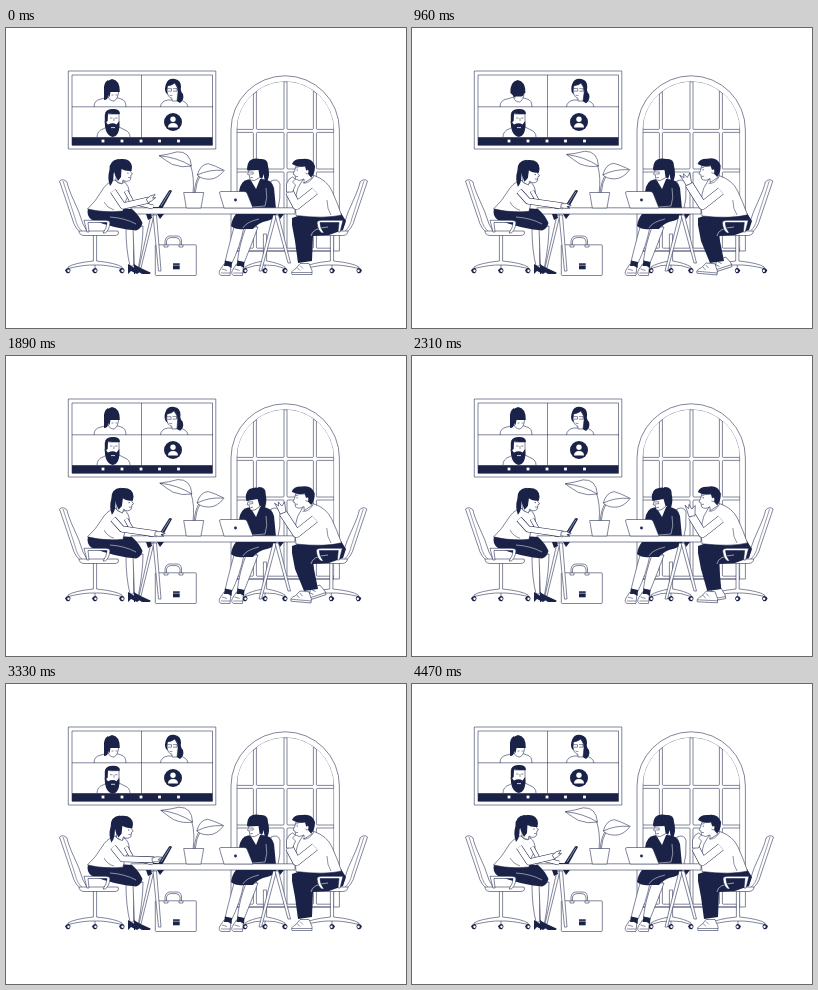
These frames come from a looping animation (400x300 px, 4.5 s). An HTML page with a canvas:

```html
<!DOCTYPE html>
<html lang="en">
<head>
<meta charset="utf-8">
<title>Hybrid meeting</title>
<style>
html, body { margin: 0; width: 100%; height: 100%; overflow: hidden; background: #fff; }
canvas { display: block; width: 100%; height: 100%; }
</style>
</head>
<body>
<canvas id="stage" width="400" height="300"></canvas>
<script>
const LOOP = 4500, STEP = 30;
const NAVY = '#1b2248', WHITE = '#fff', LINE = 0.55;
const ctx = document.getElementById('stage').getContext('2d');
const paths = new Map();

function path(d) {
  if (!paths.has(d)) paths.set(d, new Path2D(d));
  return paths.get(d);
}
function outline(d, width = LINE, color = NAVY) {
  ctx.strokeStyle = color;
  ctx.lineWidth = width;
  ctx.stroke(path(d));
}
function fill(d, color) {
  ctx.fillStyle = color;
  ctx.fill(path(d));
}
const dark = d => fill(d, NAVY);
function light(d, width = LINE) {
  fill(d, WHITE);
  outline(d, width);
}
function box(x, y, w, h, r = 0) {
  ctx.beginPath();
  ctx.roundRect(x, y, w, h, r);
  ctx.fillStyle = WHITE;
  ctx.fill();
  ctx.strokeStyle = NAVY;
  ctx.lineWidth = LINE;
  ctx.stroke();
}
function disc(x, y, r, color = NAVY) {
  ctx.beginPath();
  ctx.arc(x, y, r, 0, Math.PI * 2);
  ctx.fillStyle = color;
  ctx.fill();
}
// Runs draw() moved by dx, dy and turned by deg about px, py.
function pose(px, py, deg, dx, dy, draw) {
  ctx.save();
  ctx.translate(px + dx, py + dy);
  ctx.rotate(deg * Math.PI / 180);
  ctx.translate(-px, -py);
  draw();
  ctx.restore();
}
function mirrored(draw) {
  ctx.save();
  ctx.translate(415, 0);
  ctx.scale(-1, 1);
  draw();
  ctx.restore();
}
// Outlined tube through the given joints.
function limb(points, width) {
  ctx.beginPath();
  points.forEach(([x, y]) => ctx.lineTo(x, y));
  ctx.strokeStyle = NAVY;
  ctx.lineWidth = width + LINE;
  ctx.stroke();
  ctx.strokeStyle = WHITE;
  ctx.lineWidth = width - LINE;
  ctx.stroke();
}
const lerp = (a, b, k) => a + (b - a) * k;
const mix = (a, b, k) => a.map((v, i) => lerp(v, b[i], k));
function ease(t, start, end) {
  const k = Math.min(1, Math.max(0, (t - start) / (end - start)));
  return k * k * (3 - 2 * k);
}
const pulse = (t, a, b, c, d) => ease(t, a, b) - ease(t, c, d);
const wave = (t, cycles, phase = 0) => Math.sin((t / LOOP * cycles + phase) * Math.PI * 2);

function archWindow() {
  light('M225 234V102A54.2 54.2 0 0 1 333.4 102V223H225');
  const inner = 'M231 223V102A48.3 48.3 0 0 1 327.6 102V223Z';
  outline(inner);
  ctx.save();
  ctx.clip(path(inner));
  const columns = [231, 250.4, 281, 310.4], ends = [247.4, 278, 307.4, 328];
  const rows = [40, 104.4, 144, 183.6];
  columns.forEach((x, i) => rows.forEach((y, j) =>
    box(x, y, ends[i] - x, j ? 36.6 : 61.4, 1)));
  ctx.restore();
}

function videoCall(t) {
  box(62.3, 43, 147.5, 78);
  box(66, 47, 140.5, 70.3);

  const down = pulse(t, 30, 330, 1150, 1600);
  light('M88 79Q88 72 95 71L102 69H109L115 71Q120 72 120 79');
  if (down < 0.6) pose(103, 54, down * -20, 0, 0, () =>
    dark('M102 52Q97 55 98 63V72Q102 72 102 68L104 60Z'));
  pose(106, 70, 0, down * -0.4, down, () => {
    light('M102 62V68Q103 73 108 73Q112 71 112.5 64V60Z');
    dark('M98.8 64Q98 53 106 51Q114 52 113.8 64H104.5L103.5 69L101 66Z');
    if (down > 0.4) dark('M99.5 62H113.5Q112 68 109 67.5H103Z');
    else outline('M105.5 67h2M109.5 67h2', 0.5);
  });

  light('M154.5 79Q155 73 162 72H173Q181 73 182 79');
  pose(167, 73, wave(t, 2) * 2.5 * (1 - ease(t, 2400, 2700)), 0, 0, () => {
    dark('M160 56Q162 50 169 51Q175 52 175 59Q174 63 177 66Q178.5 72 174 75L169 72L160 65Q158 61 160 56Z');
    light('M161.5 58Q167 57 168.5 55Q172 59 172 64L171 73H166V70.5Q161.5 69 161 63Z');
    outline('M161.5 60.6h4v2.6h-4M167 60.6h4v2.6h-4M163.5 67.2q2 1 3 0', 0.5);
  });

  light('M91 109Q91 103 97 101L101 99H113L119 102Q124 104 124 109');
  pose(106, 105, 0, 0, pulse(t, 2750, 3100, 3300, 3700) * 0.7, () => {
    light('M100 86H113V99Q112 106 107 106Q101 105 100 98Z');
    dark('M98.8 95V87Q99 81.5 106 81Q114 80.5 114 86Q106 86 102 85.5L101.7 93Z');
    dark('M98.8 93L102 96.5Q107 94 110.5 96.5L113.2 93Q114.5 108 106.5 109Q98.5 107 98.8 93Z');
    outline('M104 90h2.5M109 90h2.5M108 90v3', 0.5);
    outline('M105 99.6h4', 0.8, WHITE);
  });

  disc(167, 94, 9);
  disc(167, 91.2, 2.7, WHITE);
  fill('M162 99.5Q162 95 167 95Q172 95 172 99.5Z', WHITE);
  outline('M135.5 47V109M66 78.8H207');
  ctx.fillStyle = NAVY;
  ctx.fillRect(66, 109.2, 140.5, 8.1);
  ctx.fillStyle = WHITE;
  [97, 116, 135, 153.5, 172.5].forEach(x => ctx.fillRect(x - 1.4, 111.6, 2.8, 2.8));
}

function plant(t) {
  const sway = wave(t, 2, 0.7);
  outline('M188 166Q189 153 194 146M189 166Q190 154 195 146');
  pose(187, 165, sway * 1.3, 0, 0, () => {
    outline('M185 137Q189 149 187 166');
    light('M154 127Q163 126 172 123.5Q185 123 186 138Q177 140 167 136Q162 133 154 127Z');
    outline('M154 127Q172 129 186 138');
  });
  pose(188, 165, -sway * 0.8, 0, 0, () => {
    light('M191 147Q194 136 202 135.5Q208 137 218 142Q211 151 203 151Q195 151 191 147Z');
    outline('M217 142Q203 141 191 147');
  });
  light('M177.7 164.5H197.7L195 180H180.3Z');
}

function briefcase() {
  light('M159 217V213Q160 208 164 208H171Q175 208 175.5 213V217H174V213Q173 209.6 170 209.6H165Q161 209.6 160.5 213V217Z');
  box(149.3, 216.8, 41, 30.7, 1);
  outline('M158 217v2h4v-2M173 217v2h4v-2');
  ctx.fillStyle = NAVY;
  ctx.fillRect(167, 235.3, 6.7, 6);
  outline('M167 237.3h7', 0.5, WHITE);
}

function caster(x, y = 242.5) {
  dark(`M${x - 3} ${y}Q${x - 2} ${y - 3} ${x + 1} ${y - 2.5}Q${x + 4} ${y} ${x + 1} ${y + 2.7}Q${x - 2} ${y + 3} ${x - 3} ${y}Z`);
  disc(x + 0.5, y + 0.2, 1.2, WHITE);
}
function chairBase(x, reach) {
  light(`M${x - 1.6} 206h3.2V233Q${x + reach - 6} 235 ${x + reach} 239V240.5Q${x + 10} 236.5 ${x} 237Q${x - 10} 236.5 ${x - reach} 240.5V239Q${x - reach + 6} 235 ${x - 1.6} 233Z`);
  outline(`M${x} 237V241`);
  [x - reach, x, x + reach].forEach(c => caster(c));
}
function sideChair() {
  chairBase(89, 27);
  light('M53.5 153Q57 150 61 154Q62 160 68 173Q73 183 77 196L82 205L77 206Q69 202 66 190Z');
  outline('M57 153L69 190Q71 200 78 205', 0.45);
  light('M73 203H112Q114 207.5 108 207.5H78Q73 207 73 203Z');
}
function armrest() {
  light('M78 192.3H99Q104 192.5 104 195Q103 203 99 205H97Q101 200 101 194.5H82L83 204H81Z');
}

function sneaker(x, y, turn) {
  pose(x + 14, y, turn, 0, 0, () => {
    light(`M${x + 8} ${y}H${x + 17}L${x + 20} ${y + 7}V${y + 11}H${x}Q${x - 2} ${y + 8} ${x + 4} ${y + 5}Z`);
    outline(`M${x} ${y + 9}H${x + 20}M${x + 5} ${y + 4}l3 3M${x + 8} ${y + 2}l3 3`, 0.5);
  });
}

function man(t) {
  const talk = pulse(t, 60, 390, 2050, 2600);
  const gesture = pulse(t, 350, 500, 900, 1080) * wave(t, 8);
  pose(327, 243, 0, talk * -0.7, 0, () => mirrored(sideChair));

  // The near foot tucks back under the chair while talking.
  if (talk > 0.05) sneaker(lerp(286, 297, talk), lerp(236, 230, talk), talk * -18);
  sneaker(286, 235.5, talk * 5);
  const ankle = talk * 6;
  ctx.fillStyle = NAVY;
  ctx.beginPath();
  [[286, 190], [300, 185], [335, 185], [340, 193], [337, 202], [323, 207], [307, 208],
   [306 + ankle, 233], [292 + ankle, 235], [289, 213], [286, 197]]
    .forEach(([x, y]) => ctx.lineTo(x, y));
  ctx.fill();
  outline('M305 208Q306 200 322 199', 0.55, WHITE);

  pose(325, 188, talk * -0.8, 0, 0, () => {
    light('M299 148L308 147.5Q321 152 326 163Q331 174 335.5 187Q319 191 290 187.5Q288 171 292 160Z');
    outline('M308 148Q303 156 297 155M325 187Q321 181 321 172', 0.5);
  });
  pose(300, 149, talk * -1.5 + gesture * 0.7, 0, talk * -0.5, () => {
    light('M290 138L288.5 143L287 146L289 147L289.5 151Q293 154 298 151V155L306 150L304 139Z');
    dark('M286 136Q288 130.5 296 131Q306 129 309 138Q309 146 305 149.5L302 146L300 142L299 138Q292 140 286 136Z');
    disc(291.3, 142, 0.6);
    outline('M289.5 140l3-.4M289.5 148.5h2.5', 0.5);
    light('M300.5 142q3 -1 2 3q-1 2 -3 0');
  });

  const [x, y] = mix([283.5, 164], [277, 157 + gesture], talk);
  limb([[309, 163], [290.5, 177.5], [x, y]], 8);
  pose(x, y, talk * -18 + gesture * 7, 0, 0, () => light(talk < 0.5
    ? `M${x - 3} ${y}L${x - 3} ${y - 8}Q${x - 1} ${y - 14} ${x + 3} ${y - 15}L${x + 6} ${y - 13}L${x + 3} ${y - 10}L${x + 6} ${y - 7}L${x + 3} ${y}Z`
    : `M${x - 3} ${y}L${x - 4} ${y - 7}L${x - 5} ${y - 12}L${x - 2} ${y - 8}L${x - 1} ${y - 12}L${x + 1} ${y - 7}L${x + 5} ${y - 10}L${x + 3} ${y}Z`));
  pose(327, 243, 0, talk * -0.7, 0, () => mirrored(armrest));
}

function laceShoe(x) {
  light(`M${x + 5} 236L${x + 12} 237L${x + 11} 247.5H${x + 2}Q${x - 1} 246 ${x + 1} 242Z`);
  dark(`M${x + 6} 232.5L${x + 13} 234L${x + 12.5} 240L${x + 9} 238L${x + 5} 238Z`);
  outline(`M${x + 3} 241l5 1.5M${x + 2} 245h9`, 0.5);
}

function middleWoman(t) {
  const nod = pulse(t, 1450, 1850, 2950, 3350);
  light('M265 153Q272 150 274 156Q275 170 271 186H262Z');
  chairBase(259, 20);
  light('M228 199H238Q234 219 225.5 236L219 234Q222 221 228 199Z');
  light('M240 199H252Q245 218 238 235L231.5 233Q233 218 240 199Z');
  laceShoe(213);
  laceShoe(225.5);
  dark('M230 186H270Q270 191 257 194Q250 197 247 201H238Q230 202 225 198Q226 191 230 186Z');
  outline('M237 200Q240 194 253 191', 0.5, WHITE);
  dark('M242 151.5L255 151Q266 151 268 160L270 181H236L233 164Q234 153 242 151.5Z');
  fill('M243.5 150H254.5L250 161Z', WHITE);
  outline('M260 160Q262 170 259 178L247 179', 0.5, WHITE);
  pose(251, 152, nod * -8, nod * 0.4, nod, () => {
    pose(258, 135, nod * 12, 0, 0, () =>
      dark('M254 131Q262 130 262 138Q264.5 147 261 154Q257.5 152 258 146Q258 140 254 136Z'));
    light('M243 138L243 143L241.5 146.3L243.3 147L244 152Q248 154 253 150L256 148V137Z');
    dark('M241 140.5Q241.5 130.5 249.5 130.5Q259 130 258.7 139Q258.7 146 256 151L253.5 149L252.5 142L241.5 142.5Z');
    outline('M243.2 144h4v2h-4', 0.5);
    outline('M244.5 149.6h2.3');
  });
}

function table() {
  light('M145 187H148L135 240H133Z');
  light('M147 187H150.5L155 243H152.5Z');
  light('M267 187H270.5L255.5 243H253Z');
  light('M269 187H272.5L284.5 235H282Z');
  dark('M140 186H145L146 190L142 192Z');
  dark('M151 186H158L154 191Z');
  dark('M262 186H267L266 191Z');
  dark('M272 186H278L274 191Z');
  box(125, 179.8, 164, 6.2);
}

function laptops() {
  dark('M152.5 179L163 162.5Q164.5 161.5 166 163L156.5 180Z');
  outline('M155 178L164 163.5', 0.5, WHITE);
  outline('M140 179.5H156', 0.9);
  light('M213.5 165Q213.5 163.5 215 163.5H238Q240 163.5 241 165L247 180H218Z');
  disc(229.5, 172, 1.4);
}

function leftWoman(t) {
  const raise = 1 - ease(t, 60, 390) + ease(t, 3150, 3600);
  const low = 1 - raise;
  sideChair();
  light('M120 201H128L127.5 238H124Q120 222 120 201Z');
  light('M127 200L137 198Q137 215 132.5 239H128.5Z');
  dark('M122 236L127 239L134 244L131 246L125 243L122 246Z');
  dark('M128 236L132.5 239L144.5 244.5Q145 246 142 246H136L130 242L129 246H128Z');
  dark('M82 180.5Q100 179 126 181Q133 187 136.5 195Q135 201 130 202.5Q110 201 86 192Q80 188 82 180.5Z');
  outline('M104 189Q119 190 130 196', 0.5, WHITE);
  armrest();
  pose(92, 184, low * 0.8, 0, 0, () => {
    light('M108 152L117 152.5Q124 158 123 166Q118 174 117 183Q98 185 81.5 181Q90 173 95 164Q100 155 108 152Z');
    outline('M109 152Q113 158 119 154M98 174Q101 180 108 182', 0.5);
  });
  limb([[120, 163], [126, 174], [147, 179]], 4);
  const hand = mix([151, 178], [143, 172], raise);
  limb([[107, 163], mix([116, 173], [117, 178], raise), hand], 6);
  const [x, y] = hand;
  pose(x, y, lerp(10, -28, raise) + raise * wave(t, 9) * 5, 0, 0, () =>
    light(`M${x - 2} ${y - 2}L${x + 3} ${y - 3}L${x + 8} ${y - 2}L${x + 4} ${y}L${x + 7} ${y + 1}L${x + 2} ${y + 2}L${x - 2} ${y + 2}Z`));
  pose(114, 153, low * 4 + wave(t, 4) * raise, low * 0.6, low, () => {
    pose(110, 135, low * -4, 0, 0, () =>
      dark('M113 131Q103 132 103.5 142Q101 150 104 158Q107 155 107.5 149Q107 142 113 138Z'));
    light('M124 140L124.5 143.5L126.5 146L125 147L124.5 151.5Q121 155 117 152L116 156L110 153L110 141Z');
    dark('M107 140Q107 131 115 131Q125 130 126 139L125.5 143Q119 143.5 115.5 141L115 149L112 153L109 147Z');
    disc(122, 145, 0.6);
    outline('M122 149.5h2.3', 0.5);
  });
}

function draw(t) {
  ctx.fillStyle = WHITE;
  ctx.fillRect(0, 0, 400, 300);
  ctx.lineJoin = 'round';
  ctx.lineCap = 'butt';
  archWindow();
  videoCall(t);
  briefcase();
  middleWoman(t);
  table();
  man(t);
  plant(t);
  laptops();
  leftWoman(t);
}

const start = performance.now();
function frame() {
  const t = (performance.now() - start) % LOOP;
  draw(Math.floor(t / STEP) * STEP);
  requestAnimationFrame(frame);
}
frame();
</script>
</body>
</html>
```
